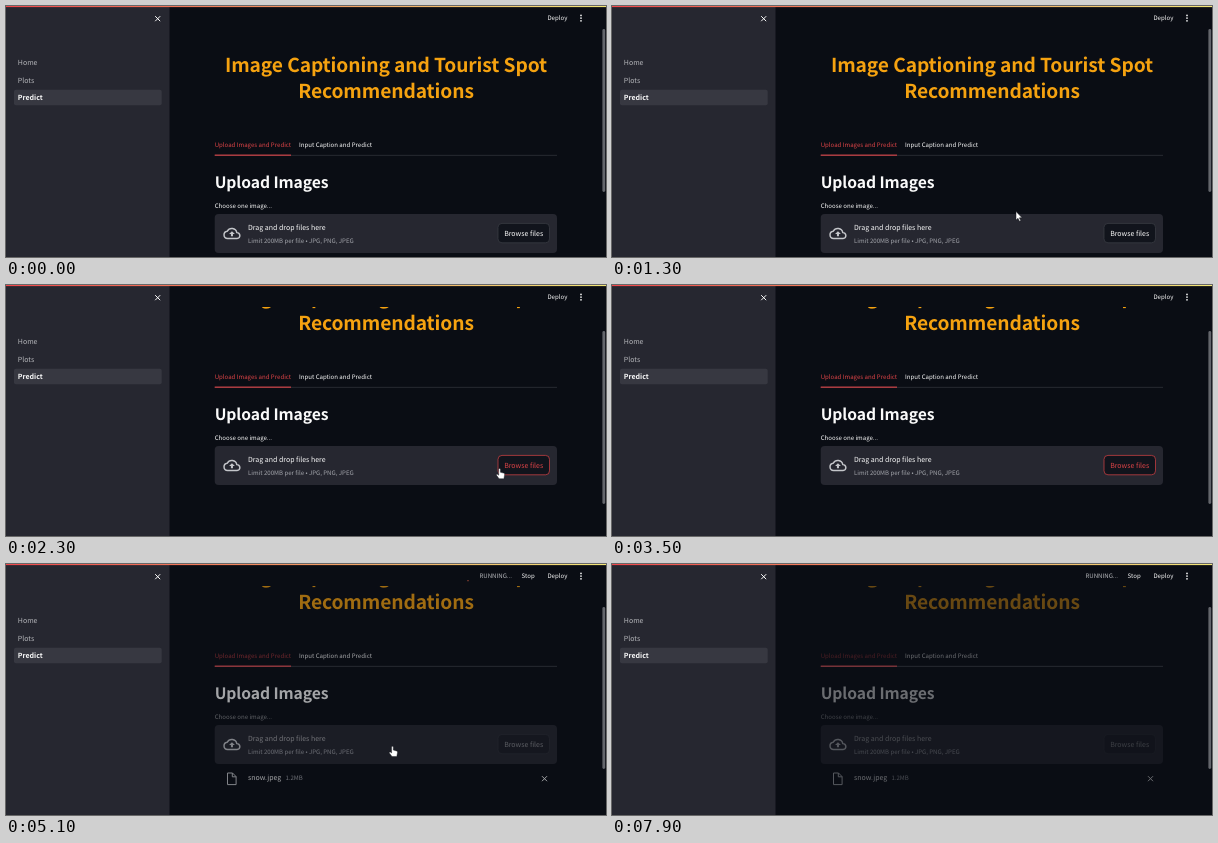
An HTML page for the animation above (8 s loop, 600 by 251 pixels).

```html
<!DOCTYPE html>
<html lang="en">
<head>
<meta charset="utf-8">
<title>Image captioning app</title>
<style>
html, body { margin: 0; width: 100%; height: 100%; overflow: hidden; background: #0a0d14; }
svg { display: block; width: 600px; height: 251px; }
text {
  font-family: "Noto Sans CJK JP", "Noto Sans CJK SC", "Noto Sans CJK", "Noto Sans", sans-serif;
  font-size: 6.1px; fill: #fafafa; text-rendering: geometricPrecision;
}
.body { font-size: 7px; }
.h1 { font-size: 19.2px; font-weight: 700; fill: #f5a210; text-anchor: middle; letter-spacing: -.005em; }
.h2 { font-size: 15.7px; font-weight: 600; letter-spacing: -.005em; }
.med { font-weight: 500; }
.grey { fill: #a3a5ab; }
.icon { fill: none; stroke: #c4c6ca; stroke-linejoin: round; }
</style>
</head>
<body>
<svg viewBox="0 0 600 251">
  <defs>
    <linearGradient id="bar">
      <stop offset="0" stop-color="#f0484c"/>
      <stop offset="1" stop-color="#f3e678"/>
    </linearGradient>
    <clipPath id="view"><rect x="163" y="22" width="437" height="229"/></clipPath>
  </defs>
  <rect width="600" height="251" fill="#0a0d14"/>

  <g clip-path="url(#view)">
    <g id="page">
      <g id="stale">
        <text class="h1" x="380" y="66">Image Captioning and Tourist Spot</text>
        <text class="h1" x="380" y="91.8">Recommendations</text>
        <text id="tab" x="208.7" y="141.4" style="fill:#dc4447">Upload Images and Predict</text>
        <text class="med" x="293" y="141.4">Input Caption and Predict</text>
        <text class="h2" x="208.7" y="182">Upload Images</text>
        <text id="label" x="208.7" y="202.3">Choose one image...</text>
        <rect x="208.7" y="208" width="342.3" height="39" rx="4" fill="#262730"/>
        <g class="icon" transform="translate(217.2 218.6) scale(.73)" stroke-width="2">
          <path d="M6 19a5 5 0 0 1-.4-9.97a7 7 0 0 1 13 1.97a4 4 0 0 1 .4 8z"/>
          <path d="M8 13h2.6v3h2.8v-3H16l-4-4z" fill="#c4c6ca" stroke="none"/>
        </g>
        <text id="drag" class="body med" x="242" y="224.4">Drag and drop files here</text>
        <text class="grey" x="242" y="236.6">Limit 200MB per file • JPG, PNG, JPEG</text>
        <g id="browse">
          <rect id="btn" x="492" y="217.4" width="51.5" height="19.4" rx="4" fill="#11141c"/>
          <text id="btnText" class="body" x="517.7" y="229.6" text-anchor="middle">Browse files</text>
        </g>
        <g id="file">
          <path class="icon" d="M221.5 256h5l3.6 3.6v8h-8.6zM226.3 256v3.8h3.8"/>
          <text class="body" x="242" y="263.4">snow.jpeg</text>
          <text class="grey" x="279.4" y="263.2">1.2MB</text>
          <path class="icon" d="M536 259.2l5 5m0-5l-5 5" style="stroke:#fafafa"/>
        </g>
      </g>
      <rect x="208.7" y="148.9" width="342.3" height=".7" fill="#33353d"/>
      <rect id="mark" x="208.7" y="148.6" width="76.3" height="1.1" fill="#e2474b"/>
    </g>
  </g>

  <g id="running">
    <g id="sparks"></g>
    <text class="grey" x="473.4" y="14.3" style="fill:#b4b6ba">RUNNING...</text>
    <text class="med" x="515.6" y="14.4">Stop</text>
  </g>
  <text class="med" x="541.4" y="14.3">Deploy</text>
  <g fill="#fafafa">
    <circle cx="575" cy="9.4" r=".85"/><circle cx="575" cy="12.1" r=".85"/><circle cx="575" cy="14.8" r=".85"/>
  </g>
  <rect id="thumb" x="596.4" width="2.8" rx="1.4" fill="#64666c"/>

  <rect width="163.5" height="251" fill="#262730"/>
  <path class="icon" d="M149.2 10.2l5 5m0-5l-5 5" style="stroke:#fafafa"/>
  <text class="body" x="11.8" y="59.2" style="fill:#b5b6ba">Home</text>
  <text class="body" x="11.8" y="76.7" style="fill:#b5b6ba">Plots</text>
  <rect x="8" y="83.7" width="147.7" height="15.6" rx="2" fill="#373841"/>
  <text class="body" x="11.8" y="94.2" style="font-weight:700">Predict</text>
  <rect width="600" height="1.1" fill="url(#bar)"/>

  <g id="arrow"><path d="M0 0v8.6l2-1.8l1.4 3l1.4-.6l-1.4-2.9h2.7z" fill="#fff" stroke="#15171c" stroke-width=".5"/></g>
  <g id="hand"><path d="M-.8 0a.85.85 0 0 1 1.7 0v3l3.2.8q1.2.3 1 1.6l-.7 4H-.4l-2.7-3.6q-.2-1.1 1-.8l1.3.9z" fill="#fff" stroke="#15171c" stroke-width=".4"/></g>
</svg>
<script>
const LOOP = 8000, STEP = 100, SCROLL = 47;
const $ = id => document.getElementById(id);
const set = (id, attrs) => { for (const k in attrs) $(id).setAttribute(k, attrs[k]); };
const show = (id, on) => set(id, { visibility: on ? "visible" : "hidden" });
const ramp = (t, a, b) => Math.min(1, Math.max(0, (t - a) / (b - a)));
const smooth = p => p * p * (3 - 2 * p);
const mix = (a, b, p) => a + (b - a) * p;

// Pointer route: time, x, y; a null position hides it
const route = [
  [500, 596, 226], [900, 480, 222], [1300, 404, 205.5], [1500, 404, 205.5],
  [2100, 493.5, 184.3], [3400, null], [4100, 381.5, 178.8],
  [5000, 381.5, 178.8], [5700, 470, 256], [5800, null]
];

function pointer(t) {
  const i = route.findLastIndex(k => k[0] <= t);
  if (i < 0 || route[i][1] === null) return null;
  const a = route[i], b = route[i + 1];
  if (b[1] === null) return [a[1], a[2]];
  const p = smooth(ramp(t, a[0], b[0]));
  return [mix(a[1], b[1], p), mix(a[2], b[2], p)];
}

// Small firework: rises, bursts, drops its embers
function firework(t) {
  const p = (t % 1000) / 1000;
  let out = "";
  if (p < .3) {
    out = `<circle cx="462" cy="${mix(19, 12, p / .3)}" r=".7" fill="#b0503c"/>`;
  } else if (p < .56) {
    const r = mix(1.5, 7, ramp(p, .3, .5));
    for (let i = 0; i < 12; i++) {
      const a = i * Math.PI / 6, c = Math.cos(a), s = Math.sin(a);
      out += `<path d="M${462 + c * r * .45} ${12 + s * r * .45}L${462 + c * r} ${12 + s * r}" stroke="#a8403a" stroke-width=".8" stroke-dasharray="1.4 .8" opacity=".75"/>`;
    }
  } else if (p < .85) {
    const q = ramp(p, .56, .85);
    for (const x of [457, 460, 465, 467])
      out += `<circle cx="${x}" cy="${15 + q * 4 - x % 2}" r=".8" fill="#80403c" opacity="${(1 - q) * .8}"/>`;
  }
  $("sparks").innerHTML = out;
}

function draw(t) {
  const scroll = smooth(ramp(t, 1400, 2100));
  set("page", { transform: `translate(0 ${-SCROLL * scroll})` });

  const loaded = t >= 4200, running = t >= 4300;
  show("file", loaded);
  show("running", running);
  if (running) firework(t); else $("sparks").innerHTML = "";

  const fade = ramp(t, 4300, 5400) ** 1.6;
  set("stale", { opacity: mix(1, .4, fade) });
  set("mark", { opacity: mix(1, .62, fade) });
  set("tab", { opacity: running ? .75 : 1 });
  set("label", { opacity: running ? .55 : 1 });
  set("drag", { opacity: running ? .62 : 1 });
  set("browse", { opacity: running ? .45 : 1 });

  const hot = t >= 2000 && !loaded;
  set("btn", { stroke: hot ? "#d94346" : "#3d3f47", "stroke-width": .7 });
  set("btnText", { style: `fill:${hot ? "#d94346" : "#fafafa"}` });

  const top = loaded ? 43 : mix(23, 46, scroll);
  set("thumb", { y: top, height: loaded ? 162 : mix(163, 173, scroll) });

  const at = pointer(t);
  const overZone = at && t >= 1900 && at[1] < 198;
  show("arrow", at && !overZone);
  show("hand", overZone);
  if (at) set(overZone ? "hand" : "arrow", { transform: `translate(${at[0]} ${at[1]})` });
}

function tick() {
  const t = performance.now() % LOOP;
  draw(Math.floor(t / STEP) * STEP);
  requestAnimationFrame(tick);
}
tick();
</script>
</body>
</html>
```
